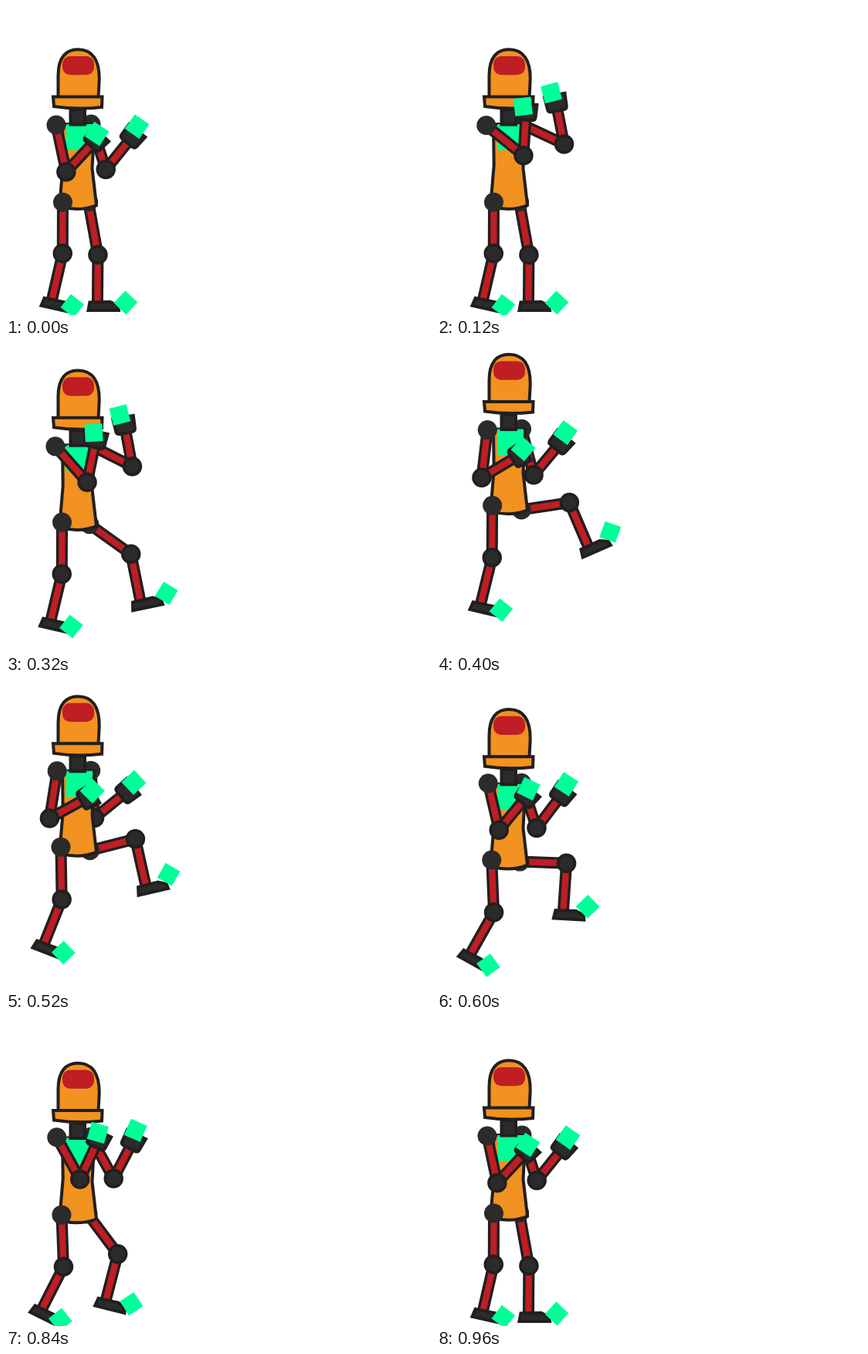
These frames come from a looping animation (550 px wide and 400 px high, 1000 ms). An HTML page with a canvas:

```html
<!DOCTYPE html>
<html lang="en">
<head>
<meta charset="utf-8">
<title>Jumping robot</title>
<style>
html, body { margin: 0; overflow: hidden; background: #fff; }
canvas { display: block; }
</style>
</head>
<body>
<canvas id="stage" width="550" height="400"></canvas>
<script>
const ctx = document.getElementById('stage').getContext('2d');
const ORANGE = '#f19221', RED = '#be1e24', DARK = '#2b2b2b', LINE = '#211f1f', GREEN = '#00ff99';
const RAD = Math.PI / 180;

// Key poses, in steps of 40 ms; the last one equals the first.
const KEYS = [0, 6, 11, 18, 24];
const lift = [0, 0, -52, 7];

const farArm = {
  x: [110, 107.5, 110, 109], y: [153, 152.5, 153, 150.5],
  upper: [71.8, -21.7, 99.6, 50.4], fore: [-51, -151, -25, -74],
  length: 61.5, hand: 42.5, cubeX: 68.4, cubeY: -3.5, turn: -4
};
const nearArm = {
  x: [65, 62.5, 66, 66.5], y: [154, 155, 154, 150.5],
  upper: [78, 0, 121, 44], fore: [-47, -126, -7, -83],
  length: 62, hand: 44.5, cubeX: [63, 63.5, 65.5, 65.5], cubeY: -4.5, turn: [-10, -11, -20, -9]
};
const farLeg = {
  x: [106.6, 106.6, 110, 105], y: [253.6, 253.6, 258.5, 249.5],
  thigh: [79.8, 79.8, -30.7, 26.5], shin: [0, 0, -29.5, 28],
  length: [69.5, 69.5, 61, 60], cubeX: [36, 36, 32.5, 29.5], cubeY: [62, 62, 54.5, 54.5], turn: 43
};
const nearLeg = {
  x: [73.5, 73.5, 71.2, 70.4], y: [254, 254, 251.3, 251.3],
  thigh: [90.2, 90.2, 90.4, 85.5], shin: [12.5, 12.5, 13.5, 40.5],
  length: [66.3, 66.3, 67.8, 67.8], cubeX: 27, cubeY: 63.5, turn: 25
};

let step = 0;

// Value of a track at the current step; plain numbers stay constant.
function at(track) {
  if (typeof track === 'number') return track;
  let i = 0;
  while (i < 3 && step >= KEYS[i + 1]) i++;
  const p = (step - KEYS[i]) / (KEYS[i + 1] - KEYS[i]);
  return track[i] + (track[(i + 1) % 4] - track[i]) * p;
}

function within(x, y, angle, draw) {
  ctx.save();
  ctx.translate(x, y);
  ctx.rotate(angle * RAD);
  draw();
  ctx.restore();
}

function shape(path, fill, width = 4) {
  const p = new Path2D(path);
  ctx.fillStyle = fill;
  ctx.fill(p);
  if (!width) return;
  ctx.strokeStyle = LINE;
  ctx.lineWidth = width;
  ctx.stroke(p);
}

function bar(x, y) {
  for (const [color, width] of [[LINE, 15], [RED, 8.2]]) {
    ctx.strokeStyle = color;
    ctx.lineWidth = width;
    ctx.beginPath();
    ctx.moveTo(0, 0);
    ctx.lineTo(x, y);
    ctx.stroke();
  }
}

function joint(x, y, rim) {
  ctx.beginPath();
  ctx.arc(x, y, rim ? 11 : 12.5, 0, 7);
  ctx.fillStyle = DARK;
  ctx.fill();
  if (!rim) return;
  ctx.strokeStyle = LINE;
  ctx.lineWidth = 3.5;
  ctx.stroke();
}

function cube(limb, size) {
  within(at(limb.cubeX), at(limb.cubeY), at(limb.turn), () => {
    ctx.fillStyle = GREEN;
    ctx.fillRect(-size / 2, -size / 2, size, size);
  });
}

// Draws the first bone with its root joint and returns the far end.
function bone(limb, angle) {
  const x = at(limb.x), y = at(limb.y), length = at(limb.length);
  within(x, y, angle, () => bar(length, 0));
  joint(x, y, false);
  return [x + length * Math.cos(angle * RAD), y + length * Math.sin(angle * RAD)];
}

function arm(limb) {
  const [x, y] = bone(limb, at(limb.upper));
  within(x, y, at(limb.fore), () => {
    bar(50, 0);
    within(limb.hand, 0, 0, () =>
      shape('M22 -13.5 L5 -12.5 Q1.5 -12 1.5 -8 V8 Q1.5 12 5 12.5 L22 13.5 Z', DARK));
    cube(limb, 22.8);
  });
  joint(x, y, true);
}

function leg(limb) {
  const [x, y] = bone(limb, at(limb.thigh));
  within(x, y, at(limb.shin), () => {
    bar(-0.5, 62);
    shape('M-10.5 61.5 L-12.5 72 H27 L26 66 L16 61 Z', DARK);
    cube(limb, 21.8);
  });
  joint(x, y, true);
}

function trunk() {
  shape('M73 153 L73.7 206 L70 250 L72 260 Q95 266.5 117 258 L111.5 210 L114.5 153 Z', ORANGE);
  shape('M78 153 H112 V186.5 H78 Z', GREEN, 0);
  shape('M83.5 134 H102 V153.5 H83.5 Z', DARK);
  shape('M67.5 118 L67.5 90 C67.5 66 78 56.3 93 56.3 C112 56.3 121 70 120.7 95 L119.5 118 Z', ORANGE);
  shape('M61 117.5 H124.5 L124 131 Q93 134.5 62 130 Z', ORANGE);
  ctx.fillStyle = RED;
  ctx.beginPath();
  ctx.roundRect(73, 65, 41, 24.3, 10);
  ctx.fill();
}

function frame() {
  step = Math.floor((performance.now() - start) % 1000 / 40);
  ctx.fillStyle = '#fff';
  ctx.fillRect(0, 0, 550, 400);
  within(0, at(lift), 0, () => {
    arm(farArm);
    leg(farLeg);
    trunk();
    leg(nearLeg);
    arm(nearArm);
  });
  requestAnimationFrame(frame);
}

const start = performance.now();
frame();
</script>
</body>
</html>
```
